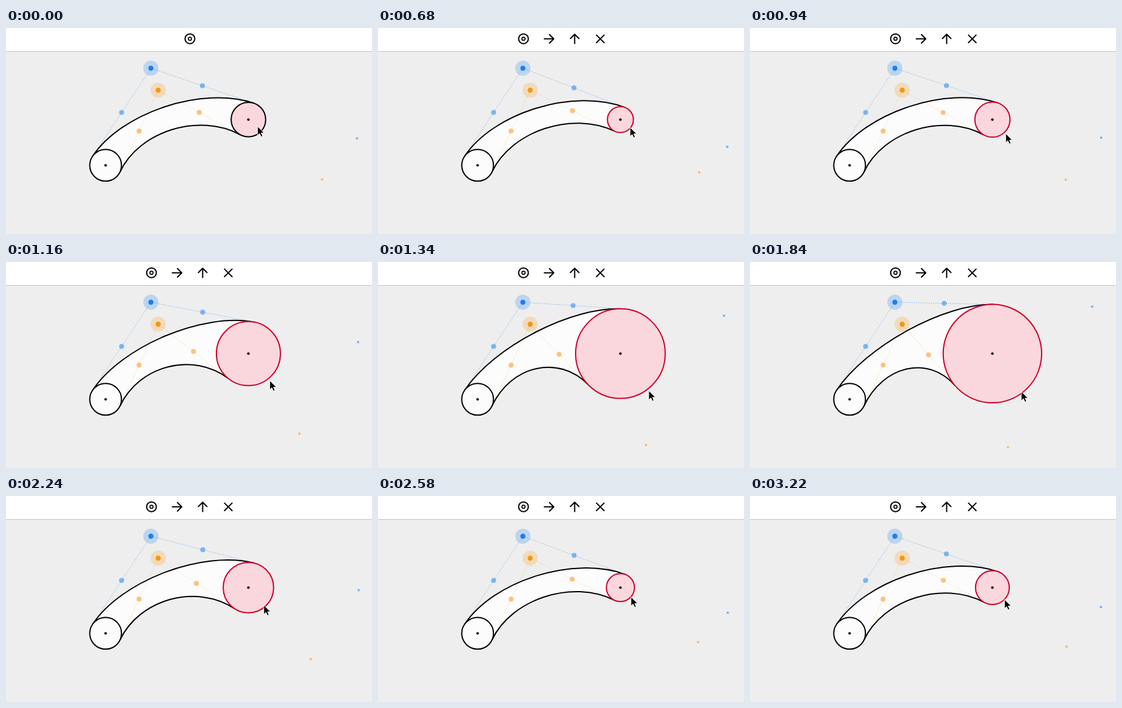
Animation of 600 by 338 pixels, one loop 3260 ms. Source, as an HTML page:

```html
<!DOCTYPE html>
<html lang="en">
<head>
<meta charset="utf-8">
<title>Tangent tube editor</title>
<style>
  html, body { margin: 0; width: 100%; height: 100%; overflow: hidden; background: #eee; }
  svg { display: block; width: 600px; height: 338px; }
  .icon, .edge { fill: none; stroke: #000; stroke-width: 2; }
  .icon { stroke-linecap: round; stroke-linejoin: round; }
  .guide { fill: none; stroke: var(--c); stroke-width: 1; stroke-dasharray: 1.5 2; }
  .blue { --c: #1a80f0; }
  .orange { --c: #f5980c; }
  .blue.guide { opacity: .55; }
  .orange.guide { opacity: .4; }
  .dot { fill: var(--c); }
  .soft { opacity: .52; }
  .orange.soft { fill: #ff8d14; }
  .halo { fill: var(--c); opacity: .23; }
  .orange.halo { fill: #ff981c; }
</style>
</head>
<body>
<svg viewBox="0 0 600 338" xmlns="http://www.w3.org/2000/svg">
  <rect width="600" height="338" fill="#eee"/>
  <rect width="600" height="38" fill="#fff"/>
  <rect y="38" width="600" height="1" fill="#c4c4c4"/>
  <g id="target" class="icon">
    <circle r="8"/>
    <circle r="2.6" stroke-width="1.6"/>
  </g>
  <g id="tools" class="icon">
    <path d="M272.6 17.8H288M281.1 10.8L288.1 17.8L281.1 24.8"/>
    <path d="M322.4 25.4V10.2M315.4 17.2L322.4 10.2L329.4 17.2"/>
    <path d="M358.2 11.6L370.6 24M370.6 11.6L358.2 24"/>
  </g>
  <path id="tube" fill="#fcfcfc"/>
  <g id="guides"></g>
  <path id="edges" class="edge"/>
  <circle cx="163.3" cy="225.3" r="26" fill="#fcfcfc" stroke="#000" stroke-width="2"/>
  <circle cx="163.3" cy="225.3" r="2.1"/>
  <circle id="ball" cx="397.4" cy="150.3" fill="#fad7dc" stroke-width="2"/>
  <circle cx="397.4" cy="150.3" r="2.1"/>
  <g id="dots"></g>
  <path id="cursor" d="M0 0V16L3.7 12.5L6.3 18.2L9 17L6.5 11.5H11.6Z"
        fill="#000" stroke="#fff" stroke-width="1"/>
</svg>
<script>
const LOOP = 3260, STEP = 20, SELECT_AT = 120, LAG = 32;
const byId = id => document.getElementById(id);
const left = { x: 163.3, y: 225.3, r: 26 };
const right = { x: 397.4, y: 150.3, r: 28.3 };

// side: which tangent to the right circle is used
const handles = [
  { name: "blue", x: 237.5, y: 66, side: -1 },
  { name: "orange", x: 249.5, y: 102, side: 1 }
];

// Turning points of the drag: time, radius
const turns = [[520, 28.3], [735, 20], [1618, 89], [2580, 23], [2980, 27.7]];

const lerp = (a, b, k) => ({ x: a.x + (b.x - a.x) * k, y: a.y + (b.y - a.y) * k });
const xy = p => p.x.toFixed(2) + " " + p.y.toFixed(2);

function ease(t, from, to) {
  const u = Math.min(1, Math.max(0, (t - from) / (to - from)));
  return (1 - Math.cos(Math.PI * u)) / 2;
}

function radiusAt(t) {
  let r = turns[0][1];
  for (let i = 1; i < turns.length; i++) {
    const [t0, r0] = turns[i - 1], [t1, r1] = turns[i];
    r += (r1 - r0) * ease(t, t0, t1);
  }
  return r;
}

// The pointer holds the rim and runs slightly ahead of the circle
function pointerAt(t) {
  const r = radiusAt(t + LAG);
  const angle = (53 - 13.5 * Math.exp((21 - r) / 15)) * Math.PI / 180;
  const rim = { x: right.x + r * Math.cos(angle), y: right.y + r * Math.sin(angle) };
  return lerp({ x: 412.3, y: 161.3 }, rim, ease(t, 0, 360));
}

function touch(p, circle, side) {
  const dx = circle.x - p.x, dy = circle.y - p.y;
  const dist = Math.hypot(dx, dy);
  const angle = Math.atan2(dy, dx) + side * Math.asin(circle.r / dist);
  const len = Math.sqrt(dist * dist - circle.r * circle.r);
  return { x: p.x + len * Math.cos(angle), y: p.y + len * Math.sin(angle) };
}

function add(parent, tag, cls, attrs = {}) {
  const el = document.createElementNS("http://www.w3.org/2000/svg", tag);
  el.setAttribute("class", cls);
  for (const key in attrs) el.setAttribute(key, attrs[key]);
  return byId(parent).appendChild(el);
}

function place(el, p) {
  el.setAttribute("cx", p.x);
  el.setAttribute("cy", p.y);
}

for (const h of handles) {
  h.start = touch(h, left, -h.side);
  h.c1 = lerp(h.start, h, .5);
  h.guide = add("guides", "path", h.name + " guide");
  const dot = (cls, r, p) => {
    const el = add("dots", "circle", h.name + " " + cls, { r });
    if (p) place(el, p);
    return el;
  };
  dot("halo", 12.5, h);
  dot("dot", 4.2, h);
  dot("dot soft", 4.1, h.c1);
  h.midDot = dot("dot soft", 4.1);
  h.farDot = dot("dot soft", 2.1);
}

function draw(t) {
  right.r = radiusAt(t);
  const selected = t >= SELECT_AT;
  for (const h of handles) {
    h.end = touch(h, right, h.side);
    h.c2 = lerp(h, h.end, .5);
    h.guide.setAttribute("d", `M${xy(h)}L${xy(h.start)}M${xy(h)}L${xy(h.end)}`);
    place(h.midDot, h.c2);
    place(h.farDot, lerp(h, h.end, 2));
  }
  const [a, b] = handles;
  const forward = h => `${xy(h.start)}C${xy(h.c1)} ${xy(h.c2)} ${xy(h.end)}`;
  byId("tube").setAttribute("d",
    `M${forward(a)}L${xy(b.end)}C${xy(b.c2)} ${xy(b.c1)} ${xy(b.start)}Z`);
  byId("edges").setAttribute("d", `M${forward(a)}M${forward(b)}`);
  byId("ball").setAttribute("r", right.r);
  byId("ball").setAttribute("stroke", selected ? "#ce002a" : "#000");
  byId("target").setAttribute("transform", `translate(${selected ? 238.5 : 301.5} 17.7)`);
  byId("tools").setAttribute("visibility", selected ? "visible" : "hidden");
  byId("cursor").setAttribute("transform", `translate(${xy(pointerAt(t))}) scale(.94)`);
}

const began = performance.now();
function tick() {
  const t = (performance.now() - began) % LOOP;
  draw(Math.floor(t / STEP) * STEP);
  requestAnimationFrame(tick);
}
tick();
</script>
</body>
</html>
```
